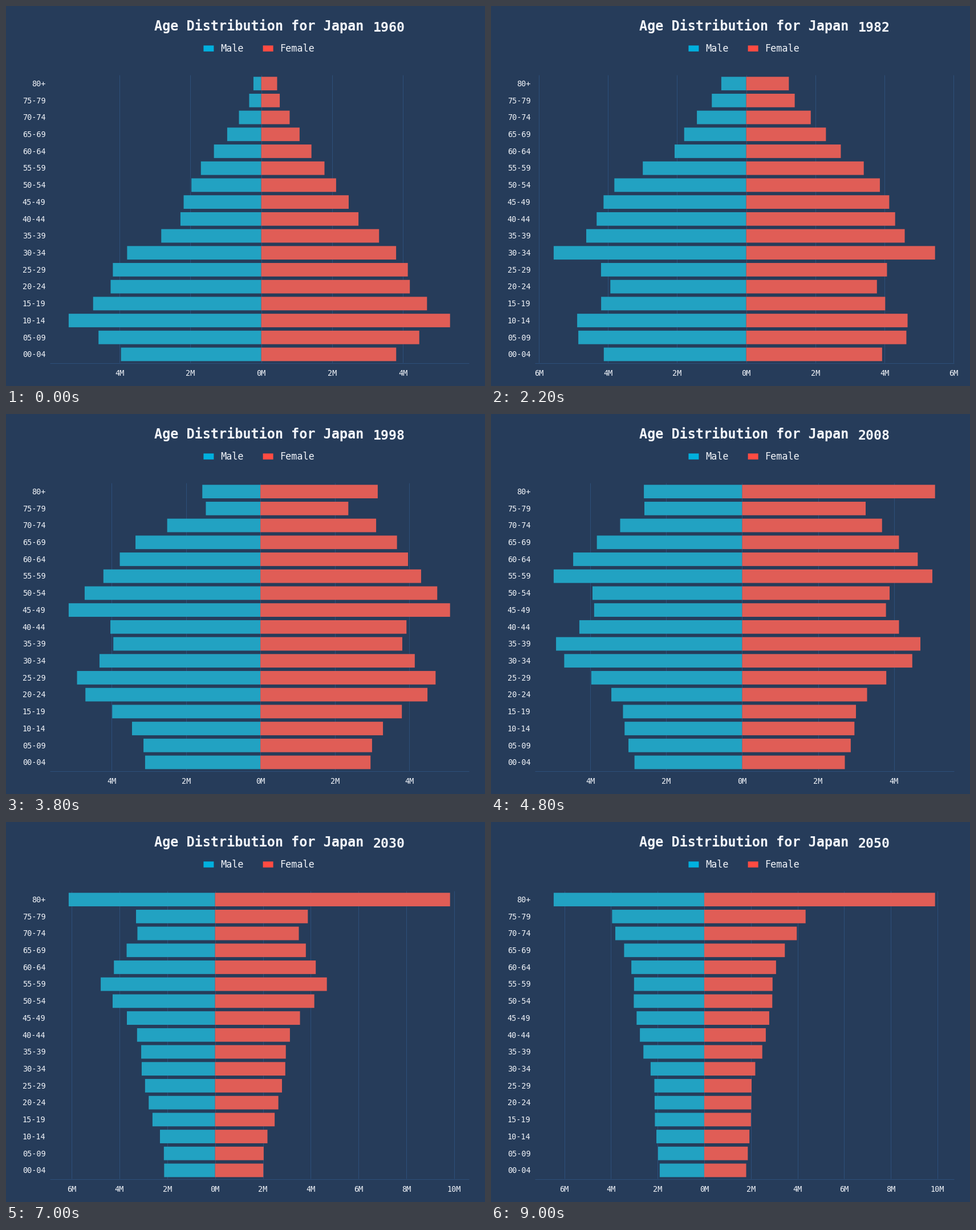
Recreate the animation shown at these times as a matplotlib script. Size 840 by 667 pixels, loop 9100 ms.

```python
import numpy as np
import matplotlib.pyplot as plt
from matplotlib.animation import FuncAnimation
from matplotlib.patches import Rectangle

W, H, DPI = 840, 667, 100
BG, GRID, INK = "#263c5a", "#2d4f7a", "#f2f5fa"
MALE, FEMALE = "#22a2c2", "#e05d56"
LEFT, SPAN = 109.9, 668.8            # extent shared by the two longest bars
X0, X1, Y0, Y1 = 77, 812, 121.3, 626.3
STEP = (Y1 - Y0) / 17
YEARS = np.arange(1960, 2051)
AGES = np.arange(105)

# Turning points: boys per birth year (thousands), and girls per boy
BOYS = [(1878, 150), (1893, 285), (1903, 400), (1914, 472), (1920, 470), (1927, 765),
        (1930, 825), (1936, 870), (1938.5, 825), (1941, 950), (1944, 985), (1946, 770),
        (1947, 1210), (1949, 1245), (1951, 970), (1953, 880), (1957, 780), (1961, 790),
        (1965, 900), (1966, 690), (1967, 980), (1970, 965), (1973, 1040), (1975, 950),
        (1982, 755), (1988, 645), (1992, 618), (1997, 622), (2007, 558), (2013, 525),
        (2018, 450), (2022, 426), (2032, 426), (2050, 375)]
GIRL_SHARE = [(1883, 1), (1895, 0.95), (1905, 1), (1916, 1.15), (1920.5, 1.26), (1927, 0.985),
              (1945, 0.985), (1957, 0.962), (1970, 0.953), (2000, 0.955), (2050, 0.941)]

# The open 80+ group is levelled at these years
OPEN_YEARS = [1960, 1972, 1982, 1998, 2017, 2030, 2050]
OPEN_MEN = [220, 380, 722, 1562, 4106, 6121, 6456]
OPEN_WOMEN = [449, 700, 1233, 3153, 7348, 9824, 9897]


def curve(points, x):
    return np.interp(x, *zip(*points))


def age_groups(births, risk, gain, growth):
    """Five-year groups of one year; mortality grows with age and falls with birth year."""
    def at(year):
        born = year - AGES - 0.5
        toll = risk * np.exp(growth * (AGES + 0.5) - gain * (born - 1976.5))
        n = births(born) * np.exp(-toll)
        return np.append(n[:80].reshape(16, 5).sum(axis=1), n[80:].sum())
    return np.array([at(y) for y in YEARS])


def level_open(table, goal):
    known = table[np.array(OPEN_YEARS) - YEARS[0], 16]
    table[:, 16] *= np.interp(YEARS, OPEN_YEARS, np.array(goal) / known)
    return table / 1000


men = level_open(age_groups(lambda b: curve(BOYS, b), 3.4e-4, 0.0166, 0.0834), OPEN_MEN)
women = level_open(age_groups(lambda b: curve(BOYS, b) * curve(GIRL_SHARE, b),
                              1.83e-4, 0.021, 0.079), OPEN_WOMEN)

fig = plt.figure(figsize=(W / DPI, H / DPI), dpi=DPI, facecolor=BG)
ax = fig.add_axes([0, 0, 1, 1])
ax.set(xlim=(0, W), ylim=(H, 0))
ax.axis("off")


def label(x, y, s, px, **kw):
    return ax.text(x, y, s, fontsize=px * 72 / DPI, family="DejaVu Sans Mono", color=INK, **kw)


def box(x, y, w, h, color):
    return ax.add_patch(Rectangle((x, y), w, h, facecolor=color, linewidth=0, zorder=3, snap=False))


def rule(x, y):
    return ax.plot(x, y, color=GRID, lw=72 / DPI, solid_capstyle="butt", zorder=1)[0]


label(259.5, 43.5, "Age Distribution for Japan", 23.55, weight="bold")
year_text = label(643.5, 45, "", 23.2, weight="bold")
for x, name, color in ((346.4, "Male", "#00b0de"), (450.6, "Female", "#ff4b42")):
    box(x, 69.3, 18, 10.5, color)
    label(x + 30, 80, name, 16.8)

rule([X0, X1], [626.5, 626.5])
left_bars, right_bars = [], []
for i in range(17):
    y = Y1 - (i + 0.9) * STEP
    left_bars.append(box(0, y, 1, 0.8 * STEP, MALE))
    right_bars.append(box(0, y, 1, 0.8 * STEP, FEMALE))
    name = "80+" if i == 16 else f"{5 * i:02d}-{5 * i + 4:02d}"
    label(69.3, y + 0.4 * STEP + 4.8, name, 13.5, ha="right")

ticks = [(v, rule([0, 0], [Y0, Y1]), label(0, 649, f"{abs(v)}M", 13.5, ha="center"))
         for v in range(-8, 13, 2)]


def draw(k):
    m, f = men[k], women[k]
    scale = SPAN / (m.max() + f.max())
    zero = LEFT + m.max() * scale
    for i in range(17):
        left_bars[i].set_x(zero - m[i] * scale)
        left_bars[i].set_width(m[i] * scale)
        right_bars[i].set_x(zero)
        right_bars[i].set_width(f[i] * scale)
    for v, line, text in ticks:
        x = zero + v * scale
        shown = X0 - 0.5 <= x <= X1
        line.set_xdata([x, x])
        text.set_x(x)
        line.set_visible(shown)
        text.set_visible(shown)
    year_text.set_text(str(YEARS[k]))
    return []


anim = FuncAnimation(fig, draw, frames=len(YEARS), interval=100, repeat=True, repeat_delay=0, blit=False)
plt.show()
```
